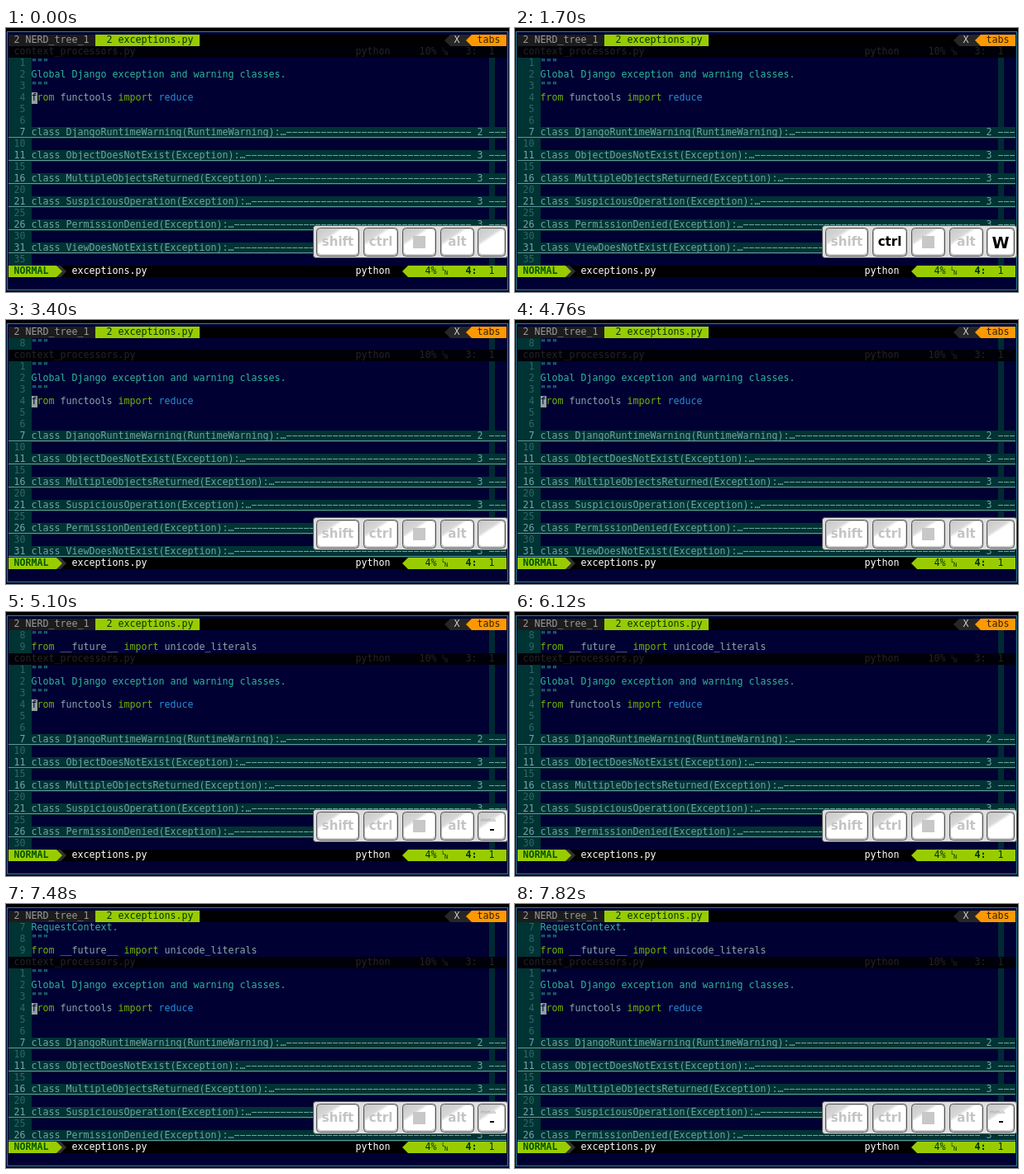
An HTML page with a canvas for the animation above (8 s loop, 608x320 px).

```html
<!DOCTYPE html>
<html lang="en">
<head>
<meta charset="utf-8">
<title>Resizing a split</title>
<style>
html, body { margin: 0; width: 100%; height: 100%; overflow: hidden; background: #000033; }
canvas { display: block; }
</style>
</head>
<body>
<canvas id="stage" width="608" height="320"></canvas>
<script>
const ctx = document.getElementById('stage').getContext('2d');
const LOOP = 8000, CELL = 7, LINE = 14, LEFT = 3, RIGHT = 605, TOP = 8;
const MONO = '11.63px "DejaVu Sans Mono", monospace';
const C = {
  bg: '#000033', gutter: '#003333', column: '#002a33', edge: '#33808c', number: '#2f6666',
  text: '#8ba6a8', fold: '#70a4a4', rule: '#5f9999', doc: '#30b49c',
  keyword: '#74b400', name: '#2a8cd6', lime: '#99cc00', orange: '#ff9900'
};

const col = c => LEFT + CELL * c;
const row = r => TOP + LINE * r;

function box(x, y, w, h, color) {
  ctx.fillStyle = color;
  ctx.fillRect(x, y, w, h);
}

function poly(color, ...points) {
  ctx.fillStyle = color;
  ctx.beginPath();
  points.forEach(([x, y]) => ctx.lineTo(x, y));
  ctx.fill();
}

function write(s, c, r, color, bold) {
  ctx.font = (bold ? 'bold ' : '') + MONO;
  ctx.textAlign = 'left';
  ctx.textBaseline = 'alphabetic';
  ctx.fillStyle = color;
  ctx.fillText(s, col(c) - 0.5, row(r) + 10);
}

function dashes(from, to, r) {
  for (let c = from; c < to; c++) box(col(c), row(r) + 6, CELL - 1, 1, C.fold);
}

// A code line is a list of [text, color] runs; a fold has a title and a size.
const code = (n, ...runs) => ({ n, runs });
const fold = (n, title, size) => ({ n, title, size });

const upper = [
  code(7, ['RequestContext.', C.doc]),
  code(8, ['"""', C.doc]),
  code(9, ['from', C.keyword], [' __future__ ', C.text], ['import', C.keyword], [' unicode_literals', C.text])
];
const lower = [
  code(1, ['"""', C.doc]),
  code(2, ['Global Django exception and warning classes.', C.doc]),
  code(3, ['"""', C.doc]),
  code(4, ['from', C.keyword], [' functools ', C.text], ['import', C.keyword], [' reduce', C.name]),
  code(5), code(6),
  fold(7, 'DjangoRuntimeWarning(RuntimeWarning)', 2), code(10),
  fold(11, 'ObjectDoesNotExist(Exception)', 3), code(15),
  fold(16, 'MultipleObjectsReturned(Exception)', 3), code(20),
  fold(21, 'SuspiciousOperation(Exception)', 3), code(25),
  fold(26, 'PermissionDenied(Exception)', 3), code(30),
  fold(31, 'ViewDoesNotExist(Exception)', 3), code(35)
];

function drawLine(line, r) {
  const y = row(r);
  box(LEFT, y, CELL * 4, LINE, C.gutter);
  box(col(83), y, CELL, LINE, C.column);
  if (line.title) {
    box(LEFT, y, RIGHT - LEFT, LINE, C.gutter);
    const head = `class ${line.title}:…`;
    write(head, 4, r, C.fold);
    dashes(4 + head.length, 80, r);
    write(String(line.size), 81, r, C.fold);
    dashes(83, 86, r);
    box(LEFT, y + 12, RIGHT - LEFT, 1, C.rule);
  } else {
    let c = 4;
    for (const [s, color] of line.runs) {
      write(s, c, r, color);
      c += s.length;
    }
  }
  write(String(line.n).padStart(3), 0, r, line.title ? C.fold : C.number);
}

function drawTabs() {
  const y = row(0), mid = y + 7, end = y + LINE;
  box(LEFT, y, RIGHT - LEFT, LINE, '#000');
  box(LEFT, y, 105, LINE, '#1c1c1c');
  write('2 NERD_tree_1', 1, 0, '#999');
  box(108, y, 126, LINE, C.lime);
  write('2 exceptions.py', 17, 0, '#003300');
  poly('#262626', [530, mid], [537, y], [564, y], [564, end], [537, end]);
  write('X', 77, 0, '#ccc');
  poly(C.orange, [556, mid], [563, y], [RIGHT, y], [RIGHT, end], [563, end]);
  write('tabs', 81, 0, '#332200');
}

function drawPosition(r, percent, line, color, bold) {
  write(percent.padStart(4), 70, r, color);
  write(line + ':', 79, r, color, bold);
  write('1', 83, r, color);
  ctx.font = '7px "DejaVu Sans Mono", monospace';
  ctx.fillText('L', 527, row(r) + 6);
  ctx.fillText('N', 530, row(r) + 11);
}

function drawQuietStatus(r) {
  const ink = '#242424';
  box(LEFT, row(r), RIGHT - LEFT, LINE, '#000008');
  write('context_processors.py', 1, r, ink);
  write('python', 60, r, ink);
  drawPosition(r, '10%', 3, ink);
}

function drawStatus() {
  const r = 20, y = row(r), mid = y + 7, end = y + LINE;
  box(LEFT, y, RIGHT - LEFT, LINE, '#000');
  poly('#303030', [62, y], [66, y], [73, mid], [66, end], [62, end]);
  poly(C.lime, [LEFT, y], [61, y], [68, mid], [61, end], [LEFT, end]);
  write('NORMAL', 1, r, '#005500', true);
  write('exceptions.py', 11, r, '#fff');
  write('python', 60, r, '#fff');
  poly(C.lime, [479, mid], [486, y], [RIGHT, y], [RIGHT, end], [486, end]);
  drawPosition(r, '4%', 4, '#003300', true);
}

function rounded(x, y, w, h, radius, fill, stroke) {
  ctx.beginPath();
  ctx.roundRect(x, y, w, h, radius);
  ctx.fillStyle = fill;
  ctx.fill();
  if (stroke) {
    ctx.strokeStyle = stroke;
    ctx.lineWidth = 1;
    ctx.stroke();
  }
}

function drawKey(x, w, label, active, size = 15) {
  const face = ctx.createLinearGradient(x, 244, x + 20, 274);
  face.addColorStop(0, active ? '#fff' : '#c8c8c8');
  face.addColorStop(0.4, active ? '#fff' : '#d8d8d8');
  face.addColorStop(0.5, '#fff');
  rounded(x + 0.5, 242.5, w, 34, 4, '#c8c8c8', '#555');
  rounded(x + 2, 244, w - 3, 30, 4, face);
  ctx.font = `bold ${size}px "DejaVu Sans", sans-serif`;
  ctx.textAlign = 'center';
  ctx.textBaseline = 'alphabetic';
  ctx.fillStyle = active ? '#000' : '#c4c4c4';
  ctx.fillText(label, x + w / 2 + 0.5, size > 15 ? 267 : 264);
}

function drawKeys({ ctrl, key }) {
  rounded(371.5, 239.5, 235, 39, 3, '#dedede', '#555');
  drawKey(375, 51, 'shift');
  drawKey(432, 41, 'ctrl', ctrl);
  drawKey(479, 40, '');
  box(492, 252, 15, 15, '#c8c8c8');
  drawKey(525, 40, 'alt');
  drawKey(570, 33, key === 'W' ? key : '', key === 'W', 19);
  if (key === '-') {
    box(585, 263, 5, 2, '#000');
    ctx.font = '6px "DejaVu Sans", sans-serif';
    ctx.fillStyle = '#999';
    ctx.fillText('minus', 583, 254);
  }
}

// Each entry holds from its time until the next one.
const splits = [[0, 0], [2040, 1], [5100, 2], [7480, 3]];
const cursor = [
  [0, true], [340, false], [1020, true], [1700, false], [2040, true],
  [3740, false], [4080, true], [5780, false], [6460, true], [6800, false], [7140, true]
];
const idle = {}, chord = { ctrl: true, key: 'W' }, minus = { key: '-' };
const presses = [
  [0, idle], [1360, chord], [2040, minus], [3060, idle],
  [4080, { ctrl: true }], [4420, chord], [4760, idle], [5100, minus], [6120, idle],
  [6460, chord], [7140, idle], [7480, minus]
];
const at = (track, t) => track.findLast(([start]) => start <= t)[1];

function draw(t) {
  box(0, 0, 608, 320, C.bg);
  box(0, 0, 608, 4, '#000');
  ctx.strokeStyle = C.edge;
  ctx.lineWidth = 1;
  ctx.strokeRect(1.5, 4.5, 605, 313);
  drawTabs();

  const n = at(splits, t);
  const first = n > 2 ? 0 : 1;
  upper.slice(first, first + n).forEach((line, i) => drawLine(line, 1 + i));
  drawQuietStatus(1 + n);
  lower.slice(0, 18 - n).forEach((line, i) => drawLine(line, 2 + n + i));
  if (at(cursor, t)) {
    box(col(4), row(5 + n), CELL, LINE, '#93a1a1');
    write('f', 4, 5 + n, C.bg);
  }
  drawStatus();
  drawKeys(at(presses, t));
}

const begin = performance.now();
function tick() {
  draw((performance.now() - begin) % LOOP);
  requestAnimationFrame(tick);
}
tick();
</script>
</body>
</html>
```
